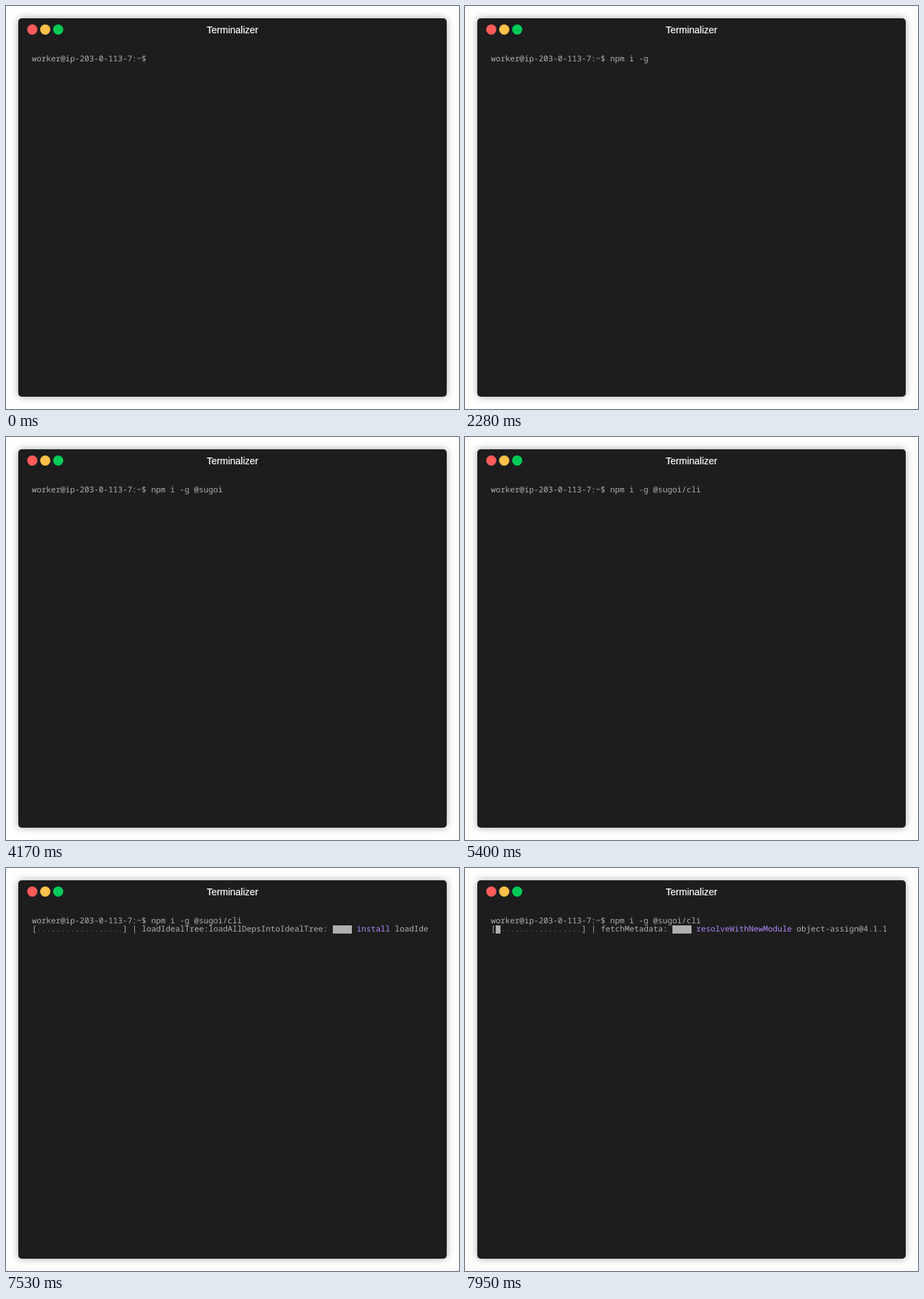
Write an HTML page that moves like this. It is 664 px wide and 590 px high and loops after 8000 ms.

```html
<!DOCTYPE html>
<html lang="en">
<head>
<meta charset="utf-8">
<title>Terminal</title>
<style>
  html, body { margin: 0; width: 100%; height: 100%; overflow: hidden; background: #fff; }
  svg { display: block; width: 664px; height: 590px; }
  .window { fill: #1d1d1d; filter: drop-shadow(0 0 6px rgba(0, 0, 0, .34)); }
  .title { font: 14px "Liberation Sans", Arial, sans-serif; fill: #fff; stroke: #fff; stroke-width: .2px; text-anchor: middle; }
  .term { font: 11.6667px "Noto Sans Mono", "DejaVu Sans Mono", monospace; fill: #afafaf; white-space: pre; text-rendering: geometricPrecision; }
  .dim { fill: #626566; }
  .level { fill: #75dff2; font-weight: bold; }
  .topic { fill: #ae89fe; }
</style>
</head>
<body>
<svg viewBox="0 0 664 590" xmlns="http://www.w3.org/2000/svg">
  <rect class="window" x="18" y="18" width="628" height="554" rx="5"/>
  <circle cx="38.5" cy="34.5" r="7.5" fill="#ff5b5b"/>
  <circle cx="57.5" cy="34.5" r="7.5" fill="#ffc04c"/>
  <circle cx="76.5" cy="34.5" r="7.5" fill="#00ca56"/>
  <text class="title" x="332" y="40">Terminalizer</text>
  <g class="term">
    <text id="command" x="38" y="81"></text>
    <g id="status"></g>
  </g>
</svg>
<script>
const LOOP = 8000, LEFT = 38, CELL = 7, ROW_TOP = 84, ROW = 12, BASELINE = 93;
const PROMPT = 'worker@ip-203-0-113-7:~$ ';

// Each typed chunk appears at once.
const keys = [
  [220, 'n'], [470, 'p'], [670, 'm'], [1870, ' i'], [2110, ' -'], [2280, 'g'],
  [3050, ' @'], [3280, 's'], [3750, 'u'], [3900, 'g'], [4010, 'o'], [4170, 'i'],
  [4580, '/'], [4750, 'c'], [4840, 'l'], [5400, 'i']
];

const fetching = (at, detail) =>
  ({ at, filled: 1, section: 'fetchMetadata:', topic: 'resolveWithNewModule', detail });

// The spinner advances by one with every status.
const SPINNER = '-\\|/';
const statuses = [
  { at: 6240 },
  { at: 6460, section: 'rollbackFailedOptional:', level: 'verb', topic: 'npm-session', detail: 'cbeb08604cb5c03e' },
  { at: 7530, section: 'loadIdealTree:loadAllDepsIntoIdealTree:', topic: 'install', detail: 'loadIde' },
  fetching(7780, 'commander@2.15.1'),
  fetching(7840, 'ansi-styles@3.2.1'),
  fetching(7900, 'chalk@2.4.1'),
  fetching(7950, 'object-assign@4.1.1')
];

const command = document.getElementById('command');
const statusRow = document.getElementById('status');

function add(name, attrs, text = '') {
  const node = document.createElementNS('http://www.w3.org/2000/svg', name);
  for (const key in attrs) node.setAttribute(key, attrs[key]);
  node.textContent = text;
  statusRow.append(node);
}

const write = (col, text, cls = '') =>
  add('text', { x: LEFT + col * CELL, y: BASELINE, class: cls }, text);

const block = (col, cells) =>
  add('rect', { x: LEFT + col * CELL, y: ROW_TOP, width: cells * CELL, height: ROW });

function drawStatus(index) {
  statusRow.replaceChildren();
  if (index < 0) return;
  const { filled = 0, section, level, topic, detail } = statuses[index];
  write(0, '[');
  if (filled) block(1, filled);
  write(1 + filled, '.'.repeat(18 - filled), 'dim');
  write(19, ']');
  write(21, SPINNER[index % 4]);
  if (!section) return;
  write(23, section);
  let col = 24 + section.length;
  if (level) write(col, level, 'level');
  else block(col, 4);
  col += 5;
  write(col, topic, 'topic');
  write(col + topic.length + 1, detail);
}

let shown;
function render(t) {
  const typed = keys.filter(([at]) => at <= t).map(([, text]) => text).join('');
  const index = statuses.filter(s => s.at <= t).length - 1;
  const state = typed + index;
  if (state === shown) return;
  shown = state;
  command.textContent = PROMPT + typed;
  drawStatus(index);
}

const start = performance.now();
function tick() {
  render((performance.now() - start) % LOOP);
  requestAnimationFrame(tick);
}
tick();
</script>
</body>
</html>
```
